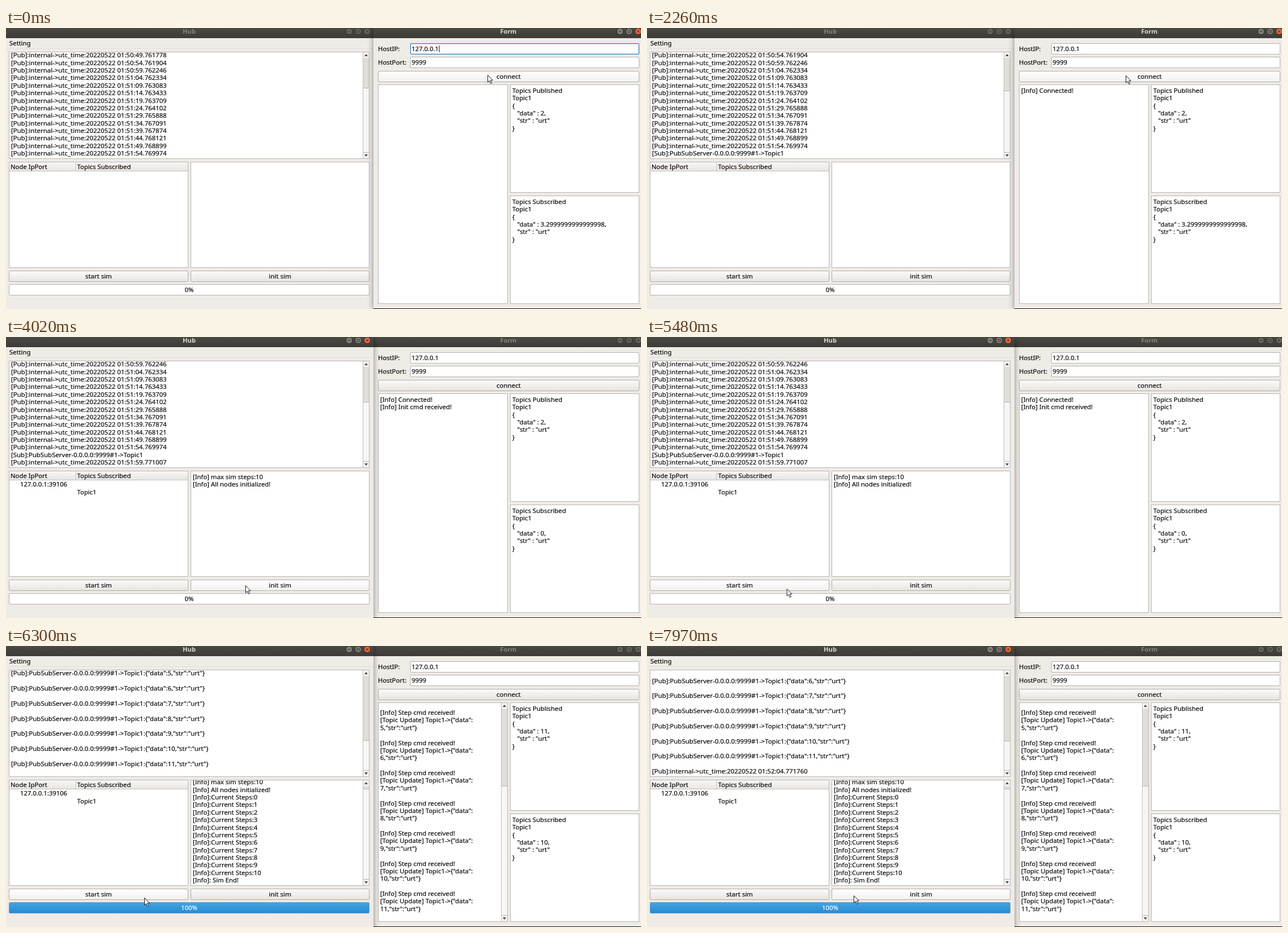
Write an HTML page that moves like this. It is 1125x498 px and loops after 8000 ms.

```html
<!DOCTYPE html>
<html lang="en">
<head>
<meta charset="utf-8">
<title>Hub and Form</title>
<style>
html, body { margin: 0; width: 100%; height: 100%; overflow: hidden; background: #111; }
#stage { position: relative; width: 1125px; height: 498px; overflow: hidden;
  font: 11.35px/13.37px "Noto Sans", "Open Sans", sans-serif; color: #0c0c0c;
  -webkit-text-stroke: .2px; }
#stage div, #stage svg { position: absolute; box-sizing: border-box; }
.text { white-space: pre; }
.win { background: #efebe7; box-shadow: 0 1px 10px rgba(0, 0, 0, .45); }
.win.active { z-index: 1; }
.bar { background: linear-gradient(#4b4944, #3c3b37); }
.title { font-weight: bold; font-size: 11.2px; text-align: center; color: #87837b; -webkit-text-stroke: 0; }
.active > .title { color: #dfdbd2; }
.ctl circle { fill: #65625b; stroke: #302f2b; }
.ctl path { fill: none; stroke: #3a3935; }
.active > .ctl circle { fill: #7f7c74; }
.active > .ctl.close circle { fill: #e2623a; }
.panel { background: #fff; border: 1px solid #b9b5b1; overflow: hidden; }
.panel > .text { left: 3px; top: 2.8px; }
.panel.end > .text { top: auto; bottom: 2.4px; }
.log > .text { font-size: 11.45px; }
.head { background: linear-gradient(#f8f6f5, #e9e5e1); border-bottom: 1px solid #c3bfba; }
.field { background: #fff; border: 1px solid #b5b1ac; border-radius: 2px; }
.field.focus { border-color: #2f7cb4; box-shadow: inset 0 0 0 1px #c5dff1; }
.button { border: 1px solid #b1ada8; border-radius: 2px; text-align: center; font-size: 11.5px;
  line-height: 17.5px; background: linear-gradient(#fbfaf9, #e8e4e0); }
.button.hover { background: linear-gradient(#fefefe, #f3f1ee); }
.button.down { background: #d9d5d1; }
.progress { background: #fff; border: 1px solid #b5b1ac; border-radius: 2px; text-align: center; line-height: 18px; }
.progress.full { color: #fff; border-color: #6f9dc0; background: linear-gradient(#3fa5e4, #2b8ace) padding-box; }
.scroll { background: #e1ddd9; border-left: 1px solid #c1bdb8; }
.cap { left: 0; width: 100%; height: 10px; background: #f5f3f1; }
.cap::after { content: ""; position: absolute; left: 2px; top: 3px; border: 3px solid transparent; }
.cap.up { top: 0; }
.cap.up::after { border-top: 0; border-bottom: 4px solid #4a4a4a; }
.cap.dn { bottom: 0; }
.cap.dn::after { border-bottom: 0; border-top: 4px solid #4a4a4a; }
.thumb { left: 0; width: 100%; bottom: 10px; background: #f8f6f5; border: solid #b9b5b1; border-width: 1px 0; }
#cursor { z-index: 5; left: 0; top: 0; overflow: visible; }
</style>
</head>
<body>
<div id="stage">
  <svg id="cursor" width="12" height="18">
    <path d="M.5 .5V13.2L3.4 10.5 5.5 15.4 7.6 14.5 5.5 9.7H9.4Z" fill="#fff" stroke="#1c1c1c"/>
  </svg>
</div>
<script>
const LOOP = 8000, WORD = "urt";
const stage = document.getElementById("stage");
const cursor = document.getElementById("cursor");

// Coordinates are in stage pixels; ox is the left edge of the parent window.
function add(parent, cls, x, y, w, h, text) {
  const el = document.createElement("div");
  el.className = cls;
  el.style.left = x - (parent.ox || 0) + "px";
  el.style.top = y + "px";
  if (w) el.style.width = w + "px";
  if (h) el.style.height = h + "px";
  if (text) el.textContent = text;
  parent.append(el);
  return el;
}
const label = (win, text, x, mid) => add(win, "text", x, mid - 6.7, 0, 0, text);

function makeWindow(name, x, w, h, titleX, ctlX) {
  const win = add(stage, "win", x, 0, w, h);
  win.ox = x;
  add(win, "bar", x, 0, w, 18);
  add(win, "title", titleX - 50, -0.7, 100, 0, name);
  ["M4.5 7H9.5", "M5 5H9V9H5Z", "M5 5L9 9M9 5L5 9"].forEach((d, i) => {
    const left = ctlX + 16 * i - 7 - x;
    win.insertAdjacentHTML("beforeend",
      `<svg class="ctl${i == 2 ? " close" : ""}" width="14" height="14" style="left:${left}px;top:-1px">` +
      `<circle cx="7" cy="7" r="5.8"/><path d="${d}"/></svg>`);
  });
  return win;
}

function makePanel(win, x, y, w, h, cls = "") {
  const el = add(win, "panel " + cls, x, y, w, h);
  const text = document.createElement("div");
  text.className = "text";
  el.append(text);
  return { el, text };
}

function makeScroll(win, x, y, h) {
  const el = add(win, "scroll", x, y, 11, h);
  el.innerHTML = '<div class="cap up"></div><div class="cap dn"></div><div class="thumb"></div>';
  return { el, y, thumb: el.lastChild };
}

const hub = makeWindow("Hub", 0, 651, 510, 324.5, 608);
label(hub, "Setting", 6, 27);
add(hub, "", 0, 36, 651, 1).style.background = "#e2deda";
const log = makePanel(hub, 5, 42, 639, 190, "log end");
const logScroll = makeScroll(hub, 632, 43, 188);
add(hub, "panel", 5, 237, 318, 188);
add(hub, "head", 6, 238, 316, 16);
add(hub, "", 123, 238, 1, 15).style.background = "#c9c5c0";
label(hub, "Node IpPort", 8, 245.5);
label(hub, "Topics Subscribed", 126, 245.5);
const node = [label(hub, "127.0.0.1:39106", 25, 261), label(hub, "Topic1", 126, 274.3)];
const steps = makePanel(hub, 327, 237, 317, 188);
const stepScroll = makeScroll(hub, 632, 238, 186);
const start = add(hub, "button", 5, 430, 318, 19.5, "start sim");
const init = add(hub, "button", 327, 430, 317, 19.5, "init sim");
const progress = add(hub, "progress", 5, 454, 639, 20);

const form = makeWindow("Form", 651, 480, 497, 890, 1088);
label(form, "HostIP:", 659, 37);
label(form, "HostPort:", 659, 61);
const host = add(form, "field", 716, 27, 406, 20);
add(form, "field", 716, 51, 406, 20);
label(form, "127.0.0.1", 718.5, 37);
label(form, "9999", 718.5, 61);
const caret = add(form, "", 767, 31, 1, 12);
caret.style.background = "#111";
const connect = add(form, "button", 659, 76, 463, 19.5, "connect");
const info = makePanel(form, 659, 100, 230, 389);
const infoScroll = makeScroll(form, 877, 101, 387);
const published = makePanel(form, 893, 100, 229, 192);
const subscribed = makePanel(form, 893, 297, 229, 192);

const utc = time => "[Pub]:internal->utc_time:20220522 01:" + time;
const early = ("50:49.761778 50:54.761904 50:59.762246 51:04.762334 51:09.763083 51:14.763433 51:19.763709 " +
  "51:24.764102 51:29.765888 51:34.767091 51:39.767874 51:44.768121 51:49.768899 51:54.769974").split(" ").map(utc);
const range = (n, fn) => Array.from({ length: n }, (_, i) => fn(i));
const json = (name, value) => `Topics ${name}\nTopic1\n{\n   "data" : ${value},\n   "str" : "${WORD}"\n}`;

const simLog = range(10, i => `[Pub]:PubSubServer-0.0.0.0:9999#1->Topic1:{"data":${i + 2},"str":"${WORD}"}\n`);
const simInfo = range(10, i =>
  `[Info] Step cmd received!\n[Topic Update] Topic1->{"data":\n${i + 2},"str":"${WORD}"}\n`);
const simSteps = range(11, i => "[Info]:Current Steps:" + i).concat("[Info]: Sim End!");

// Moments at which the interface reacts
const T = { press: 590, connected: 720, node: 2330, focus: 3880, ready: 4020, run: 5680, done: 5810, tick: 7290 };

// Pointer positions hold until the next entry; an entry without x hides it.
const path = [[0, 853, 83], [2260, 848, 84], [2330, 820, 106], [2400, 745, 150], [2460, 640, 215],
  [2530], [2690, 492, 324], [2760, 476, 335], [3020]];
function glide(t0, t1, n, x0, y0, x1, y1) {
  for (let i = 1; i <= n; i++) {
    const k = 1 - (1 - i / n) ** 1.6;
    path.push([t0 + (t1 - t0) * (i - 1) / (n - 1), x0 + (x1 - x0) * k, y0 + (y1 - y0) * k]);
  }
}
glide(3160, 3530, 7, 478, 381, 424, 440);
path.push([4480, 422, 440.5], [4550, 421, 441]);
glide(4820, 5480, 11, 421, 441, 247.5, 446);
path.push([6030, 246.5, 445.5], [6230, 245.5, 446], [6300, 245, 446]);
glide(7550, 7970, 7, 245, 446, 366, 442);

function setText(el, text) {
  if (el.textContent !== text) el.textContent = text;
}
const show = (el, on) => { el.style.display = on ? "" : "none"; };
function setScroll(bar, on, top) {
  show(bar.el, on);
  bar.thumb.style.top = top - bar.y + "px";
}
function setButton(el, over, down) {
  el.classList.toggle("hover", over && !down);
  el.classList.toggle("down", down);
}

function draw(t) {
  const connected = t >= T.connected, joined = t >= T.node, ready = t >= T.ready;
  const done = t >= T.done, ticked = t >= T.tick, hubActive = t >= T.focus;

  hub.classList.toggle("active", hubActive);
  form.classList.toggle("active", !hubActive);
  host.classList.toggle("focus", t < T.press);
  show(caret, t < T.press);

  const lines = early.slice();
  if (connected) lines.push("[Sub]:PubSubServer-0.0.0.0:9999#1->Topic1");
  if (joined) lines.push(utc("51:59.771007"));
  if (done) lines.push(...simLog);
  if (ticked) lines.push(utc("52:04.771760"));
  // A final line break needs a second one to show as an empty row.
  setText(log.text, lines.join("\n") + (done && !ticked ? "\n" : ""));
  setScroll(logScroll, true, ticked ? 168 : done ? 167 : joined ? 115 : connected ? 111 : 106);
  node.forEach(el => show(el, joined));

  const report = ready ? ["[Info] max sim steps:10", "[Info] All nodes initialized!"] : [];
  setText(steps.text, report.concat(done ? simSteps : []).join("\n"));
  steps.el.classList.toggle("end", done);
  setScroll(stepScroll, done, 253);

  const notes = [];
  if (connected) notes.push("[Info] Connected!");
  if (ready) notes.push("[Info] Init cmd received!");
  if (done) notes.push(...simInfo);
  setText(info.text, notes.join("\n") + (done ? "\n" : ""));
  info.el.classList.toggle("end", done);
  setScroll(infoScroll, done, 248);

  setText(published.text, json("Published", done ? 11 : 2));
  setText(subscribed.text, json("Subscribed", done ? 10 : ready ? 0 : "3.2999999999999998"));
  setText(progress, done ? "100%" : "0%");
  progress.classList.toggle("full", done);

  const [, x, y] = path.findLast(p => p[0] <= t);
  show(cursor, x !== undefined);
  if (x !== undefined) cursor.style.transform = `translate(${x}px, ${y}px)`;
  const onRow = y > 429 && y < 450;
  setButton(connect, y > 75 && y < 96, t >= T.press && t < T.connected);
  setButton(init, onRow && x >= 327, t >= T.focus && t < T.ready);
  setButton(start, onRow && x < 323, t >= T.run && t < T.done);
}

function frame() {
  draw(performance.now() % LOOP);
  requestAnimationFrame(frame);
}
frame();
</script>
</body>
</html>
```
